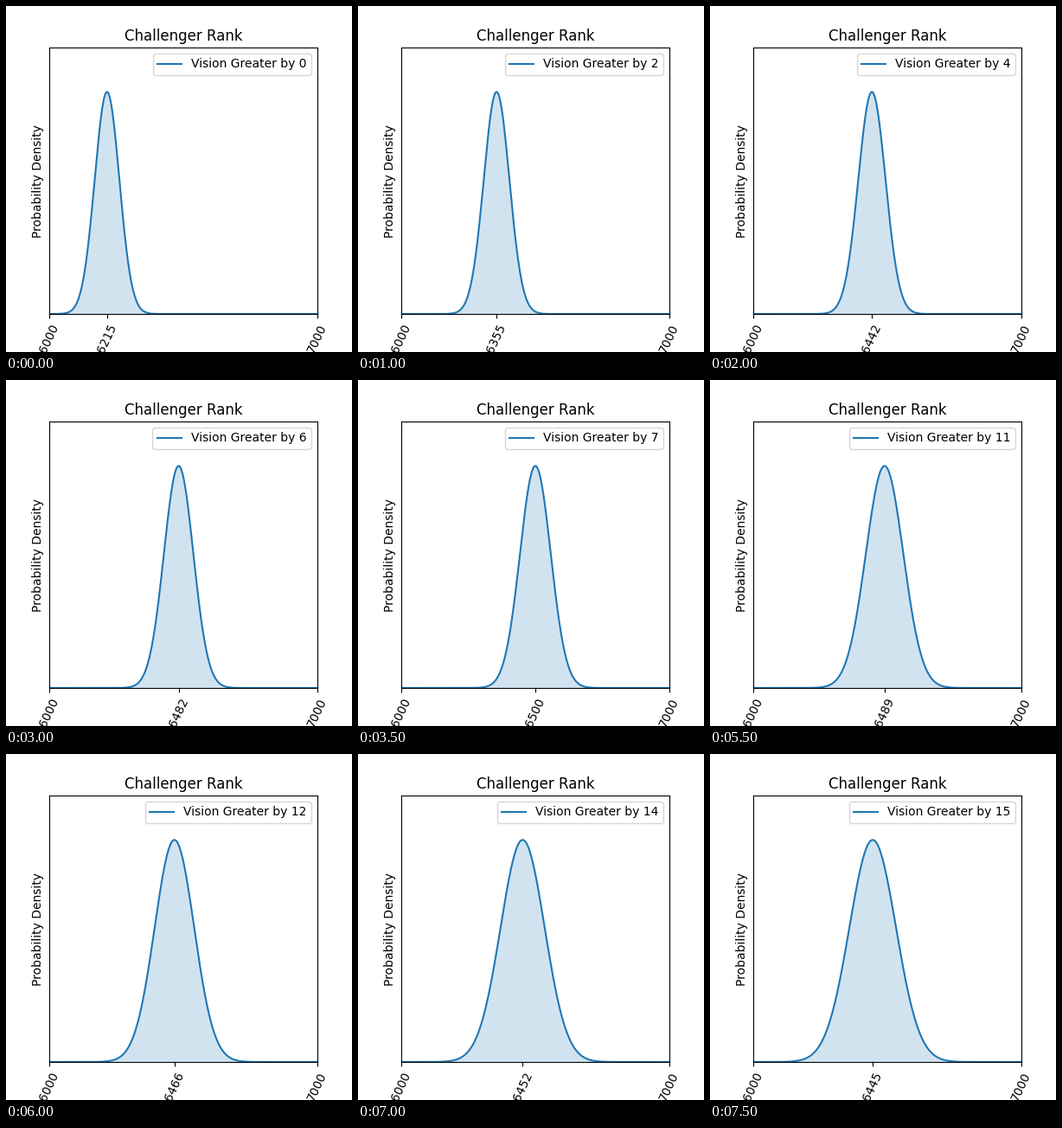
A matplotlib script that plays this animation: 400 px wide and 400 px high, repeating every 8000 ms.

```python
import matplotlib.pyplot as plt
import numpy as np
from matplotlib.animation import FuncAnimation

LOW, HIGH = 6000, 7000
LEADS = 16
# Rating turning points: vision lead and mean rank
KEY_LEADS = [0, 2, 4, 6, 9, 12, 15]
KEY_MEANS = [6215.5, 6355.5, 6442.5, 6482.5, 6535.5, 6466.8, 6445.5]

fig, ax = plt.subplots(figsize=(4, 4), dpi=100)
x = np.linspace(LOW, HIGH, 1000)


def bell(mean, sigma):
    return np.exp(-((x - mean) / sigma) ** 2 / 2)


def draw(lead):
    ax.clear()
    mean = np.interp(lead, KEY_LEADS, KEY_MEANS)
    # Larger leads are rarer, so the estimate widens
    sigma = 46 + 0.62 * lead + 0.14 * lead ** 2
    y = bell(mean, sigma)
    ax.plot(x, y, color="tab:blue", label=f"Vision Greater by {lead}")
    ax.fill_between(x, y, color="tab:blue", alpha=0.2, linewidth=0)
    ax.set_xlim(LOW, HIGH)
    ax.set_ylim(0, 1.2)
    ticks = [LOW, mean, HIGH]
    ax.set_xticks(ticks, [int(t) for t in ticks], rotation=65)
    ax.set_yticks([])
    ax.set_ylabel("Probability Density")
    ax.set_title("Challenger Rank")
    ax.legend(loc="upper right")
    return []


anim = FuncAnimation(fig, draw, frames=LEADS, interval=500,
                     repeat=True, repeat_delay=0)
plt.show()
```
